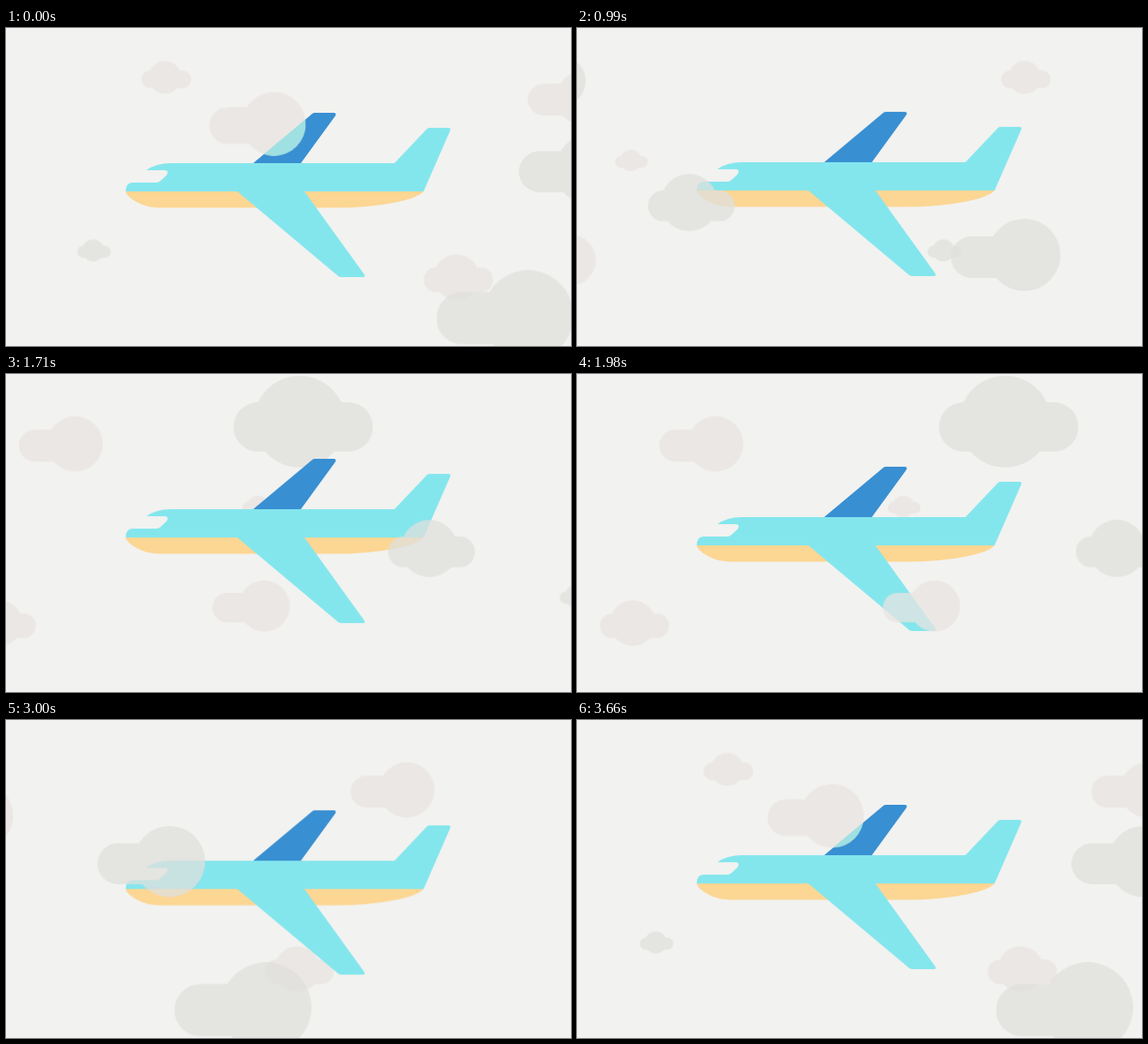
Recreate the animation shown at these times as an HTML page. Size 640 by 360 pixels, loop 3690 ms.

```html
<!DOCTYPE html>
<html lang="en">
<head>
<meta charset="utf-8">
<title>Plane among clouds</title>
<style>
  html, body { margin: 0; width: 100%; height: 100%; overflow: hidden; background: #f2f2f0; }
  svg { display: block; width: 640px; height: 360px; }
  .gray { fill: #dfdfdd; fill-opacity: .75; }
  .pink { fill: #e9e3e1; fill-opacity: .75; }
  .tint { fill: #9fe1e2; }

  /* --d: distance per loop, --t: time of entry at the left edge */
  .cloud { animation: drift 3690ms linear var(--t) infinite; }
  @keyframes drift { to { transform: translateX(var(--d)); } }

  .bob { --s: 1; animation: bob 3690ms cubic-bezier(.37, 0, .63, 1) infinite; }
  .still { --s: -1; }
  @keyframes bob {
    0%, 100% { transform: translateY(0); }
    14.6% { transform: translateY(calc(var(--s) * -3.5px)); }
    26% { transform: translateY(calc(var(--s) * -1px)); }
    38.8% { transform: translateY(calc(var(--s) * -8.5px)); }
    54.2% { transform: translateY(calc(var(--s) * 9px)); }
    68% { transform: translateY(calc(var(--s) * 3.6px)); }
    75.9% { transform: translateY(calc(var(--s) * 9px)); }
    90.2% { transform: translateY(calc(var(--s) * .3px)); }
  }
</style>
</head>
<body>
<svg viewBox="0 0 640 360">
  <defs>
    <!-- clouds are 100 units wide, with the right edge at x = 0 -->
    <path id="side" d="M-81 16H-19A19 19 0 0 1-19 54H-81A19 19 0 0 1-81 16Z
      M-66 33A33 33 0 0 1 0 33A33 33 0 0 1-66 33Z"/>
    <path id="mid" d="M-82.7 18.5H-17.3A17.3 17.3 0 0 1-17.3 53H-82.7A17.3 17.3 0 0 1-82.7 18.5Z
      M-84.5 32A32 32 0 0 1-20.5 32A32 32 0 0 1-84.5 32Z"/>
    <path id="wing" d="M280 153L347 97Q348 96 350 96H371Q375 96 373 99.500L334 153Z"/>
    <clipPath id="inWing"><use href="#wing"/></clipPath>
  </defs>

  <g class="pink">
    <g class="cloud" style="--d:1219px;--t:-636ms"><use href="#mid" transform="translate(0 37.300) scale(.58)"/></g>
    <g class="cloud" style="--d:1075px;--t:-2355ms"><use href="#side" transform="translate(0 47.800) scale(.95)"/></g>
    <g class="cloud" style="--d:1151px;--t:-2958ms"><use href="#mid" transform="translate(0 137.800) scale(.38)"/></g>
    <g class="cloud" style="--d:965px;--t:-2112ms"><use href="#mid" transform="translate(0 256.200) scale(.805)"/></g>
  </g>
  <g class="gray">
    <g class="cloud" style="--d:1179px;--t:-372ms"><use href="#mid" transform="translate(0 239.300) scale(.39)"/></g>
    <g class="cloud" style="--d:2080px;--t:-2720ms"><use href="#mid" transform="translate(0 2) scale(1.62)"/></g>
  </g>

  <g class="bob">
    <use href="#wing" fill="#388fd2"/>
    <path fill="#fcd693" d="M135.500 185H473Q467 192 441 197.500Q411 203.500 373 203.500H174Q160 203.500 148 197Q137 191 135.500 185Z"/>
    <path fill="#84e6ed" d="M159 161Q170 153 187 153H440L477 114Q478 113 480 113H501Q504.500 113 503 116.500L473 185H338L405.500 278.500Q408 282 404 282H380Q378 282 376.500 281L262 185H135.500Q136 175 143 175H170Q173 175 175 173L181.500 167Q183 165.500 183 163.500Q183 161 180 161Z"/>
  </g>

  <g class="gray">
    <g class="cloud" style="--d:1806px;--t:-3067ms"><use href="#mid" transform="translate(0 165.200) scale(1.01)"/></g>
    <g class="cloud" style="--d:2325px;--t:-3568ms"><use href="#side" transform="translate(0 216) scale(1.24)"/></g>
    <g class="cloud" style="--d:2553px;--t:-1015ms"><use href="#side" transform="translate(0 120) scale(1.22)"/></g>
    <g class="cloud" style="--d:1587px;--t:-1493ms"><use href="#side" transform="translate(0 274.300) scale(1.55)"/></g>
  </g>
  <g class="pink">
    <g class="cloud" style="--d:1538px;--t:-2750ms"><use href="#side" transform="translate(0 233.800) scale(.875)"/></g>
    <g class="cloud" style="--d:1771px;--t:-706ms"><use href="#side" transform="translate(0 72.500) scale(1.09)"/></g>
  </g>

  <!-- the far wing shows through the cloud above it -->
  <g class="bob tint"><g clip-path="url(#inWing)"><g class="bob still">
    <g class="cloud" style="--d:1771px;--t:-706ms"><use href="#side" transform="translate(0 72.500) scale(1.09)"/></g>
  </g></g></g>
</svg>
</body>
</html>
```
